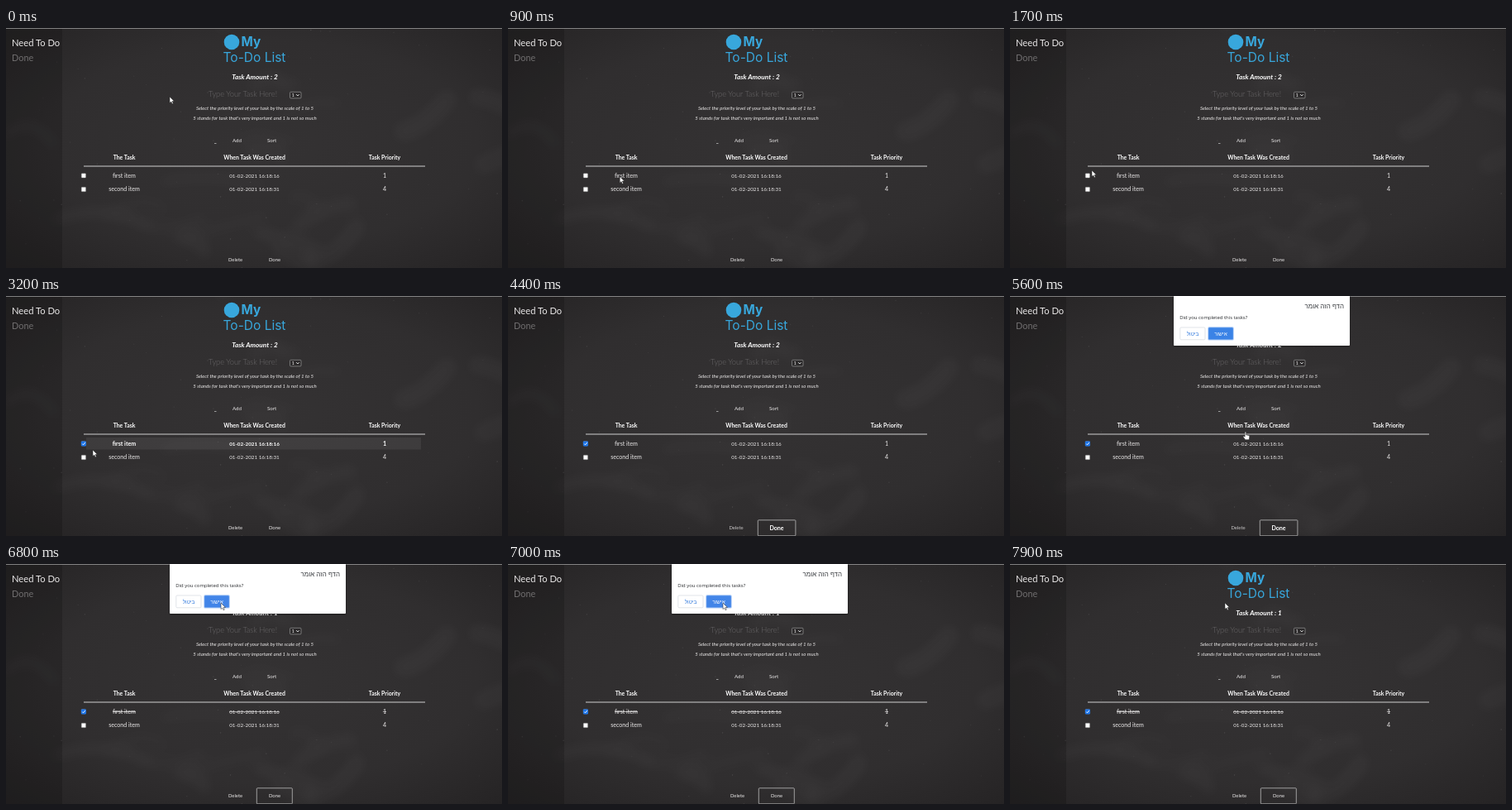
Recreate the animation shown at these times as an HTML page. Size 600x290 px, loop 8000 ms.

```html
<!DOCTYPE html>
<html lang="en">
<head>
<meta charset="utf-8">
<title>To-do list</title>
<style>
html, body { margin: 0; width: 100%; height: 100%; overflow: hidden; background: #2d2b2c; }
svg { display: block; width: 100vw; height: 100vh; }
text { font-family: Lato, "Open Sans", sans-serif; fill: #eceaea; white-space: pre; }
.mid { text-anchor: middle; }
.bold { font-weight: 700; fill: #fff; }
.light { font-weight: 300; }
.it { font-style: italic; }
.logo { font-family: Inter, sans-serif; fill: #38a7dc; }
.ui { font-family: "Open Sans", sans-serif; fill: #27292c; }
.he { font-family: "Liberation Sans", "DejaVu Sans", sans-serif; fill: #33363a; }
.struck { text-decoration: line-through; }
</style>
</head>
<body>
<svg id="stage" viewBox="0 0 600 290" preserveAspectRatio="none">
  <defs>
    <radialGradient id="board" cx=".52" cy=".48" r=".72">
      <stop offset="0" stop-color="#343233"/>
      <stop offset=".6" stop-color="#302e2f"/>
      <stop offset="1" stop-color="#252324"/>
    </radialGradient>
    <filter id="blur" x="-50%" y="-50%" width="200%" height="200%"><feGaussianBlur stdDeviation="7"/></filter>
    <filter id="shade" x="-10%" y="-20%" width="120%" height="150%">
      <feDropShadow dx="0" dy="1" stdDeviation="1.2" flood-opacity=".4"/>
    </filter>
  </defs>
  <rect width="600" height="290" fill="url(#board)"/>
  <g id="smudges" filter="url(#blur)" stroke="#fff" stroke-linecap="round" fill="none"/>
  <g id="dust" fill="#fff"/>
  <rect width="68" height="290" fill="#000" opacity=".16"/>
  <rect width="600" height="1" fill="#aaa" opacity=".7"/>
  <g id="page"/>
  <g id="dialog" filter="url(#shade)">
    <rect x="198" y="-4" width="213" height="64" rx="1" fill="#fff"/>
  </g>
  <path id="arrow" d="M0 0V7.6L1.8 6L3 8.8L4.3 8.2L3.1 5.5H5.5Z" fill="#fff" stroke="#222" stroke-width=".5"/>
  <path id="hand" d="M0 .8Q.8-.4 1.5.8V4L4.9 4.7Q5.8 5 5.6 6.2L5 9.8H.6L-2.2 6.2Q-2 5-.9 5.6L0 6.3Z"
    fill="#fff" stroke="#222" stroke-width=".5"/>
</svg>
<script>
const LOOP = 8000, STEP = 100;
const $ = id => document.getElementById(id);
const page = $("page"), dialog = $("dialog");

function add(parent, tag, attrs) {
  const el = document.createElementNS("http://www.w3.org/2000/svg", tag);
  for (const k in attrs) el.setAttribute(k, attrs[k]);
  return parent.appendChild(el);
}
function label(parent, str, x, y, size, cls = "", extra = {}) {
  const el = add(parent, "text", { x, y, "font-size": size, class: cls, ...extra });
  el.textContent = str;
  return el;
}
const show = (el, on) => el.setAttribute("visibility", on ? "visible" : "hidden");

// chalk traces
let seed = 11;
const rnd = () => (seed = seed * 16807 % 2147483647) / 2147483647;
for (let i = 0; i < 22; i++) {
  const x = rnd() * 600, y = rnd() * 290, w = 30 + rnd() * 90;
  add($("smudges"), "path", {
    d: `M${x} ${y}q${w / 2} ${rnd() * 40 - 30} ${w} ${rnd() * 60 - 40}`,
    "stroke-width": 6 + rnd() * 16, opacity: .012 + rnd() * .022
  });
}
for (let i = 0; i < 70; i++)
  add($("dust"), "circle", { cx: rnd() * 600, cy: rnd() * 290, r: .3 + rnd() * .5, opacity: .04 + rnd() * .09 });

// sidebar, logo, form
label(page, "Need To Do", 7, 22, 11.2);
label(page, "Done", 7, 39.6, 10.9, "", { fill: "#777", style: "fill:#706e6f" });
add(page, "circle", { cx: 273, cy: 17, r: 9.3, fill: "#38a7dc" });
label(page, "My", 284.5, 22, 15.3, "logo", { "font-weight": 700 });
label(page, "To-Do List", 300.5, 41, 15.5, "logo mid");
const amount = label(page, "", 301, 62, 8.2, "mid bold it");
label(page, "Type Your Task Here!", 286.5, 83.3, 9.3, "mid light", { style: "fill:#6a6869" });
add(page, "rect", { x: 343.5, y: 77.3, width: 13.5, height: 7.6, rx: 1, fill: "#2b292a", stroke: "#999", "stroke-width": .7 });
label(page, "1", 345.6, 83.2, 5.8);
add(page, "path", { d: "M351.2 80.2l1.7 1.8l1.7-1.8", fill: "none", stroke: "#eee", "stroke-width": .9 });
label(page, "Select the priority level of your task by the scale of 1 to 5", 301, 99, 6.1, "mid it");
label(page, "5 stands for task that's very important and 1 is not so much", 301, 111, 6.1, "mid it");
add(page, "rect", { x: 252, y: 139, width: 2.5, height: .9, fill: "#aaa" });
label(page, "Add", 279.5, 138.3, 6.1, "mid");
label(page, "Sort", 321.5, 138.3, 6.1, "mid");

// table
const cols = [143, 300.5, 458];
["The Task", "When Task Was Created", "Task Priority"]
  .forEach((s, i) => label(page, s, cols[i], 158.6, 6.9, "mid bold"));
add(page, "rect", { x: 94, y: 166.5, width: 413, height: 1, fill: "#d0cfcf" });
const glow = add(page, "rect", { x: 97, y: 171, width: 405, height: 14.5, fill: "#fff" });

function row(y, cells) {
  add(page, "rect", { x: 91.2, y: y - 2.7, width: 5.4, height: 5.4, rx: .8, fill: "#fff", stroke: "#777", "stroke-width": .5 });
  return cells.map((s, i) => label(page, s, cols[i], y + 2.3, i == 1 ? 6.3 : 7.1, "mid"));
}
const first = row(178.4, ["first item", "01-02-2021 16:18:16", "1"]);
row(195, ["second item", "01-02-2021 16:18:31", "4"]);
const check = add(page, "g", {});
add(check, "rect", { x: 90.9, y: 175.4, width: 6, height: 6, rx: .8, fill: "#1a73e8" });
add(check, "path", { d: "M92.2 178.5l1.3 1.4l2.3-3", fill: "none", stroke: "#fff", "stroke-width": .9 });

// footer buttons
const del = label(page, "Delete", 277.5, 282.4, 5.9, "mid");
const frame = add(page, "rect", { y: 270.8, height: 19, rx: .8, fill: "none", stroke: "#bbb", "stroke-width": .8 });
const done = label(page, "Done", 325, 282.4, 5.9, "mid");

// confirm box
label(dialog, "הדף הזה אומר", 404, 14.8, 7.9, "he", { "text-anchor": "end" });
label(dialog, "Did you completed this tasks?", 205.3, 27.6, 5.93, "ui");
add(dialog, "rect", { x: 205.8, y: 38, width: 30.2, height: 14.8, rx: 1.2, fill: "#fff", stroke: "#d5d9e0", "stroke-width": .7 });
label(dialog, "ביטול", 221, 47.6, 6.4, "he mid", { style: "fill:#2f78dc" });
add(dialog, "rect", { x: 239.3, y: 37.3, width: 31.4, height: 16.2, rx: 1.6, fill: "#a9c8f5" });
const ok = add(dialog, "rect", { x: 240.2, y: 38.2, width: 29.6, height: 14.4, rx: 1.2 });
label(dialog, "אישור", 255, 47.6, 6.4, "he mid", { style: "fill:#fff" });

// pointer stops: time, x, y
const path = [
  [100, 198, 83], [1000, 133, 183], [1700, 99, 172], [2300, 93.5, 178], [2700, 94, 178],
  [3200, 105, 186], [3700, 225, 250], [4200, 318, 282], [4700, 316, 266],
  [5500, 285, 168], [6400, 260, 47]
];
function pointer(t) {
  const i = path.findIndex(p => p[0] > t);
  if (i == 0) return path[0].slice(1);
  if (i < 0) return path[path.length - 1].slice(1);
  const [t0, x0, y0] = path[i - 1], [t1, x1, y1] = path[i];
  let k = (t - t0) / (t1 - t0);
  k = k * k * (3 - 2 * k);
  return [x0 + (x1 - x0) * k, y0 + (y1 - y0) * k];
}
const within = (t, a, b) => t >= a && t < b;
const ramp = (t, a, b) => Math.max(0, Math.min(1, (t - a) / 200, (b - t) / 200));

function draw(t) {
  const hover = Math.max(ramp(t, 1000, 1600), ramp(t, 1800, 3500));
  const armed = within(t, 4200, 6500), finished = t >= 6500;

  amount.textContent = "Task Amount : " + (finished ? 1 : 2);
  glow.setAttribute("opacity", .065 * hover);
  first.forEach(el => el.setAttribute("class",
    "mid" + (hover > .5 ? " bold" : "") + (finished ? " struck" : "")));
  show(check, t >= 2500);

  show(frame, armed || finished);
  frame.setAttribute("x", armed ? 302.3 : 303.3);
  frame.setAttribute("width", armed ? 45.6 : 43);
  done.setAttribute("class", armed ? "mid bold" : "mid");
  done.setAttribute("font-size", armed ? 7.1 : 5.9);
  done.setAttribute("y", armed ? 283 : 282.4);
  del.setAttribute("x", armed ? 276 : 277.5);
  del.setAttribute("opacity", armed ? .82 : 1);

  show(dialog, within(t, 4500, 7100));
  ok.setAttribute("fill", t >= 6300 ? "#4285e8" : "#3a83e6");

  const [x, y] = pointer(t), at = `translate(${x} ${y})`;
  const hand = within(t, 4700, 6200);
  $("arrow").setAttribute("transform", at);
  $("hand").setAttribute("transform", at);
  show($("hand"), hand);
  show($("arrow"), !hand && !within(t, 4200, 4700));
}

const start = performance.now();
function tick() {
  const t = (performance.now() - start) % LOOP;
  draw(Math.floor(t / STEP) * STEP);
  requestAnimationFrame(tick);
}
tick();
</script>
</body>
</html>
```
